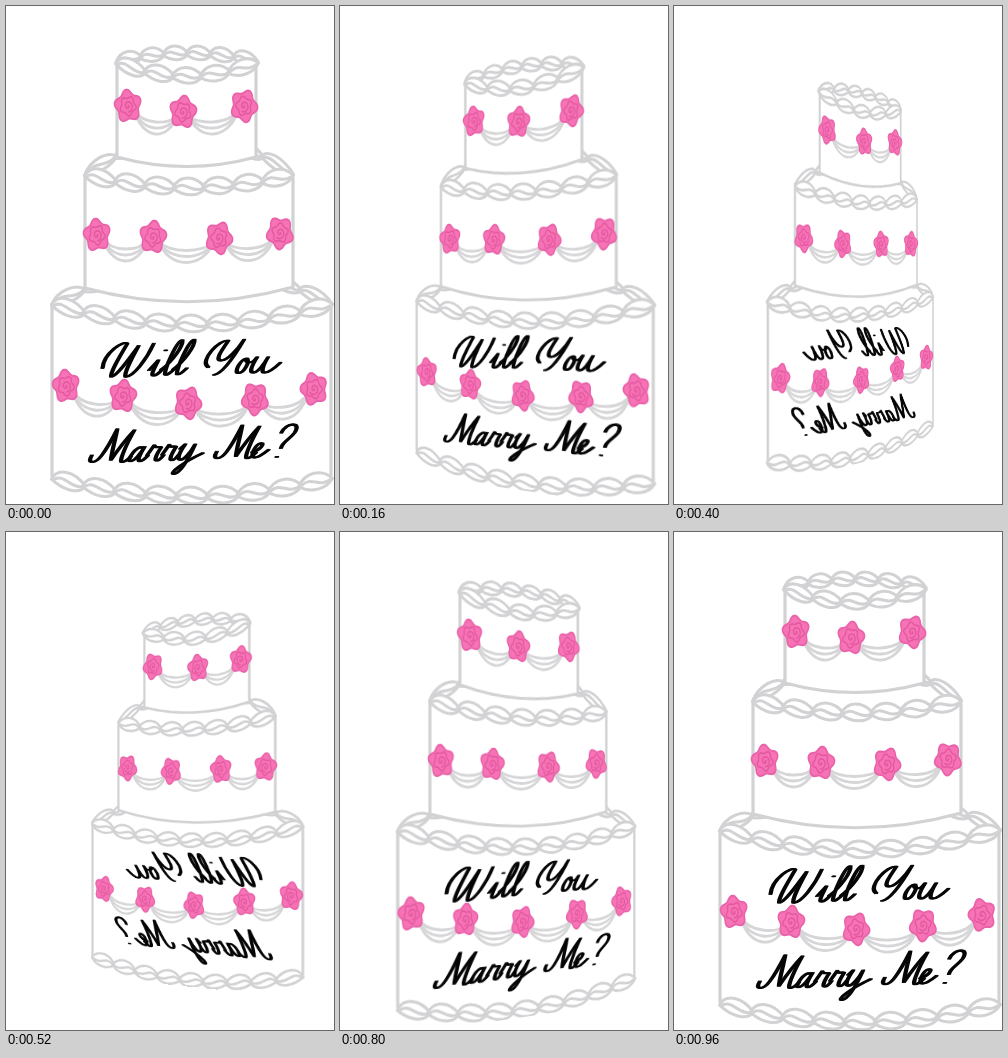
Recreate the animation shown at these times as an HTML page. Size 328 px wide and 498 px high, loop 2880 ms.

```html
<!DOCTYPE html>
<html lang="en">
<head>
<meta charset="utf-8">
<style>
  html, body { margin: 0; width: 100%; height: 100%; overflow: hidden; background: #fff; }
  svg { display: block; width: 328px; height: 498px; transform-origin: 185.5px 268px; }
  path { fill: none; stroke-linecap: round; stroke-linejoin: round; }
  .body { fill: #fff; stroke: #d2d2d4; stroke-width: 3.2; }
  .rope { fill: #fff; stroke: #d2d2d4; stroke-width: 3; }
  .swag { stroke: #d6d6d8; stroke-width: 2.8; }
  .petal { fill: #f673b6; stroke: #ea62a9; stroke-width: 2; }
  .fold { stroke: #e4589f; stroke-width: 1.6; }
  .ink { stroke: #050505; stroke-width: 1.7; }
</style>
</head>
<body>
<svg id="cake" viewBox="0 0 328 498" role="img" aria-label="Will You Marry Me?"></svg>
<script>
const cake = document.getElementById('cake');
const round = n => Math.round(n * 100) / 100;

function add(cls, d, transform) {
  const path = document.createElementNS('http://www.w3.org/2000/svg', 'path');
  path.setAttribute('class', cls);
  path.setAttribute('d', d);
  if (transform) path.setAttribute('transform', transform);
  cake.append(path);
}

// Twisted icing: overlapping leaves along a shallow parabola.
function rope(cx, rx, cy, sag, count, h) {
  const at = (t, offset) => {
    const v = 2 * t / count - 1;
    return `${round(cx + rx * v)} ${round(cy + sag * (1 - v * v) + offset * h)}`;
  };
  for (let i = 0; i < count; i++) {
    add('rope', `M${at(i - .05, .3)}C${at(i + .15, -1.3)} ${at(i + .7, -1.3)} ${at(i + 1.05, .2)}` +
      `C${at(i + .85, 1.35)} ${at(i + .35, 1.3)} ${at(i - .05, .3)}Z`);
    add('rope', `M${at(i + .05, .2)}C${at(i + .35, -.7)} ${at(i + .6, .9)} ${at(i + .97, .3)}`);
  }
}

function ring(radius, lobes, depth) {
  let d = '';
  for (let i = 0; i <= 60; i++) {
    const a = i / 60 * 2 * Math.PI;
    const r = radius * (1 - depth + depth * Math.cos(lobes * a));
    d += `${i ? 'L' : 'M'}${round(r * Math.cos(a))} ${round(r * Math.sin(a))}`;
  }
  return d + 'Z';
}

function spiral(radius, turns) {
  let d = 'M0 0';
  for (let i = 1; i <= 30; i++) {
    const a = i / 30 * turns * 2 * Math.PI;
    d += `L${round(radius * i / 30 * Math.cos(a))} ${round(radius * i / 30 * Math.sin(a))}`;
  }
  return d;
}

function flower([x, y], i) {
  const place = `translate(${x} ${y}) scale(.83 1) rotate(${i * 16 - 98}) `;
  add('petal', ring(16.5, 5, .12), place);
  add('fold', ring(10, 5, .12), place + 'rotate(36)');
  add('fold', spiral(6, 1.5), place);
}

function garland(flowers) {
  flowers.slice(1).forEach(([x2, y2], i) => {
    const [x1, y1] = flowers[i];
    for (const sag of [12, 18, 24]) {
      const low = (y1 + y2) / 2 + sag * 4 / 3;
      add('swag', `M${x1 + 6} ${y1 + 4}C${x1 + 15} ${low} ${x2 - 15} ${low} ${x2 - 6} ${y2 + 4}`);
    }
  });
  flowers.forEach(flower);
}

const glyphs = {
  W: 'M-8 -8C-12 -22 2 -34 6 -30C4 -20 0 -4 3 0C8 0 14 -20 17 -28C15 -16 13 -3 16 0C23 0 29 -16 30 -30',
  i: 'M0 -5L5 -14C4 -6 3 0 6 0C9 0 11 -4 12 -6M8 -23h.5',
  l: 'M0 -5C7 -12 12 -26 9 -32C4 -32 3 -6 5 -1C7 1 10 -3 12 -6',
  Y: 'M-3 -6C-14 -12 -2 -32 6 -30C4 -22 0 -13 6 -12C13 -12 18 -24 20 -31C17 -16 12 0 5 1',
  o: 'M8 -13C2 -14 0 0 5 0C10 0 12 -12 7 -13C8 -9 12 -9 15 -11',
  u: 'M0 -10L2 -14C0 -6 0 0 4 0C8 0 11 -8 12 -14C10 -5 11 0 14 0Q19 0 25 -9',
  M: 'M-8 -6C-10 2 -2 2 1 -6C4 -14 5 -22 6 -30C8 -20 9 -8 11 -2C14 -12 18 -22 22 -29C20 -18 18 0 22 0Q25 0 28 -5',
  a: 'M10 -12C3 -16 -1 0 3 0C7 0 10 -8 11 -13C9 -5 9 0 12 0Q14 0 17 -5',
  r: 'M0 -5L3 -14C5 -10 8 -14 10 -12C8 -5 8 0 11 0Q13 0 15 -5',
  y: 'M0 -10L3 -14C0 -5 1 0 4 0C8 0 11 -8 12 -14C11 0 9 12 3 13C-2 12 8 2 22 -6',
  e: 'M1 -5C7 -6 10 -13 6 -13C1 -13 0 0 5 0Q9 0 15 -7',
  '?': 'M1 -22C2 -32 16 -32 13 -22C11 -16 5 -14 6 -8M5 0h.5'
};

// Shifted copies give the broad-nib contrast of the lettering.
function letter(word, xs, baseline) {
  [...word].forEach((char, i) => {
    const y = baseline - (xs[i] - 95) * .03;
    for (const shift of [-1.2, 0, 1.2])
      add('ink', glyphs[char], `translate(${xs[i] + shift} ${round(y)}) skewX(-21) scale(1.1)`);
  });
}

function drawCake() {
  add('body', 'M46 298V470M325 298V470');
  rope(186, 139, 296, -34, 9, 7);
  rope(186, 139, 297, 20, 9, 8.5);
  rope(186, 139, 471, 18, 9, 8.5);

  add('body', 'M79 172V282Q183 310 287 281V172');
  rope(183, 103, 166, -34, 7, 7);
  rope(183, 103, 168, 12, 7, 8.5);

  add('body', 'M111 60V151Q181 170 250 151V60');
  rope(181, 70, 54, -8, 6, 7);
  rope(181, 70, 56, 13, 5, 8);

  garland([[122, 100], [177, 106], [238, 100]]);
  garland([[91, 229], [147, 231], [213, 232], [274, 227]]);
  garland([[60, 380], [117, 390], [182, 397], [249, 393], [308, 383]]);

  letter('WillYou', [102, 141, 153, 165, 203, 227, 243], 371);
  letter('MarryMe?', [92, 121, 139, 154, 170, 217, 243, 265], 456);
}

const LOOP = 2880, SPIN = 960, STEP = 40, DEPTH = 735;
const smooth = t => t * t * (3 - 2 * t);

function render(ms) {
  const t = Math.min(Math.floor(ms % LOOP / STEP) * STEP / SPIN, 1);
  const angle = -360 * smooth(t);
  const away = -.235 * DEPTH * smooth(1 - Math.abs(2 * t - 1));
  cake.style.transform = t % 1
    ? `perspective(${DEPTH}px) translateZ(${away}px) rotateY(${angle}deg)` : 'none';
}

drawCake();
render(0);
const start = performance.now();
requestAnimationFrame(function tick(now) {
  render(Math.max(0, now - start));
  requestAnimationFrame(tick);
});
</script>
</body>
</html>
```
